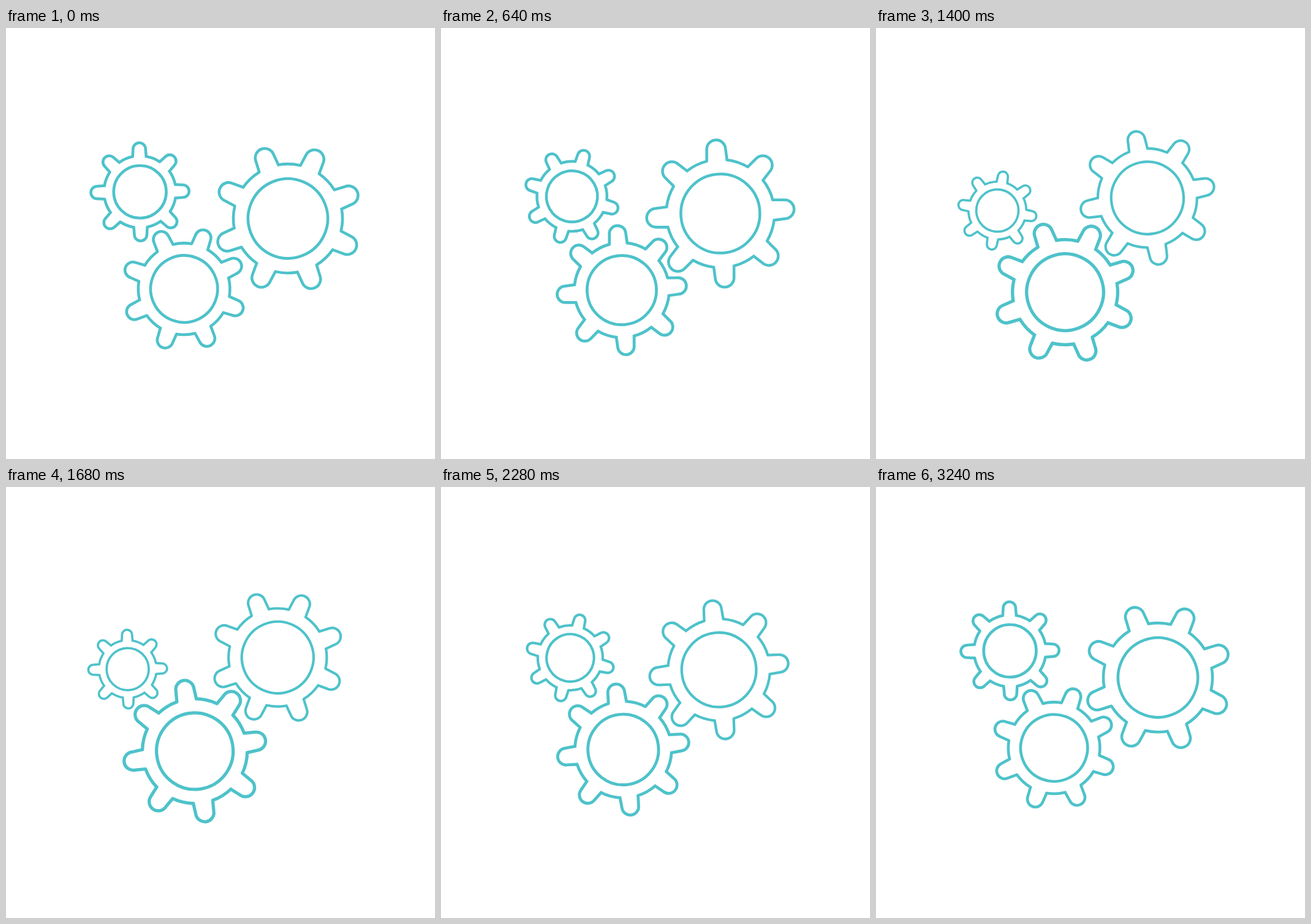
Recreate the animation shown at these times as an HTML page with a canvas. Size 700 by 704 pixels, loop 3.28 s.

```html
<!DOCTYPE html>
<html lang="en">
<head>
<meta charset="utf-8">
<title>Gears</title>
<style>
html, body { margin: 0; width: 100%; height: 100%; overflow: hidden; background: #fff; }
canvas { display: block; }
</style>
</head>
<body>
<canvas id="stage" width="700" height="704"></canvas>
<script>
const ctx = document.getElementById('stage').getContext('2d');
const LOOP = 3280, STEP = 40, TEETH = 8;

// Cubic ease with control points (a, 0) and (b, 1).
function ease(x, a, b) {
  let lo = 0, hi = 1;
  for (let i = 0; i < 30; i++) {
    const s = (lo + hi) / 2, u = 1 - s;
    if (3 * a * s * u * u + 3 * b * s * s * u + s * s * s < x) lo = s;
    else hi = s;
  }
  return lo * lo * (3 - 2 * lo);
}

// Goes 0 to 1 until the peak time, then back to 0 at the loop's end.
const swing = (peak, a, b, c, d) => t => t < peak
  ? ease(t / peak, a, b)
  : 1 - ease((t - peak) / (LOOP - peak), c, d);

const turn = swing(1480, .576, .545, .383, .339);
const counterTurn = swing(1480, .585, .537, .386, .337);
const move = swing(1480, .695, .439, .426, .272);
const shrinkSmall = swing(1520, .796, .629, .474, .326);
const shrinkLarge = swing(1640, .946, .633, .529, .341);

const gears = [
  { x: 218.6, y: 267.6, dx: -20.6, dy: 30.7, r: 42.9, dr: -8.6, size: shrinkSmall, angle: -0.9, spin: 372, turn, bend: 1 },
  { x: 460, y: 311.2, dx: -17.2, dy: -33.7, r: 65, dr: -6.5, size: shrinkLarge, angle: 24.1, spin: 372, turn, bend: 1 },
  { x: 290.6, y: 426.2, dx: 18, dy: 5.3, r: 54.6, dr: 8.1, size: move, angle: 20.3, spin: -402.5, turn: counterTurn, bend: .7 }
];

// Outline in units of the inner circle's radius.
function gearPath() {
  const root = 1.37, base = .257, tip = .238, capY = 1.63;
  const half = Math.asin(base / root), pitch = 2 * Math.PI / TEETH;
  const path = new Path2D(), tooth = new Path2D();
  tooth.moveTo(-base, -root * Math.cos(half));
  tooth.lineTo(-tip, -capY);
  tooth.arc(0, -capY, tip, Math.PI, 2 * Math.PI);
  tooth.lineTo(base, -root * Math.cos(half));
  tooth.arc(0, 0, root, half - Math.PI / 2, pitch - half - Math.PI / 2);
  for (let i = 0; i < TEETH; i++) {
    path.addPath(tooth, new DOMMatrix().rotate(i * 360 / TEETH));
  }
  path.moveTo(1, 0);
  path.arc(0, 0, 1, 0, 2 * Math.PI);
  return path;
}

const outline = gearPath();

function drawGear(g, t) {
  const p = move(t), scale = g.r + g.dr * g.size(t);
  ctx.save();
  ctx.translate(g.x + g.dx * p, g.y + g.dy * p ** g.bend);
  ctx.rotate((g.angle + g.spin * g.turn(t)) * Math.PI / 180);
  ctx.scale(scale, scale);
  ctx.lineWidth = 4.6 / g.r;
  ctx.stroke(outline);
  ctx.restore();
}

const start = performance.now();

function frame() {
  const t = Math.floor((performance.now() - start) % LOOP / STEP) * STEP;
  ctx.fillStyle = '#fff';
  ctx.fillRect(0, 0, 700, 704);
  ctx.strokeStyle = '#4ec2ca';
  ctx.lineCap = 'round';
  for (const g of gears) drawGear(g, t);
  requestAnimationFrame(frame);
}
frame();
</script>
</body>
</html>
```
